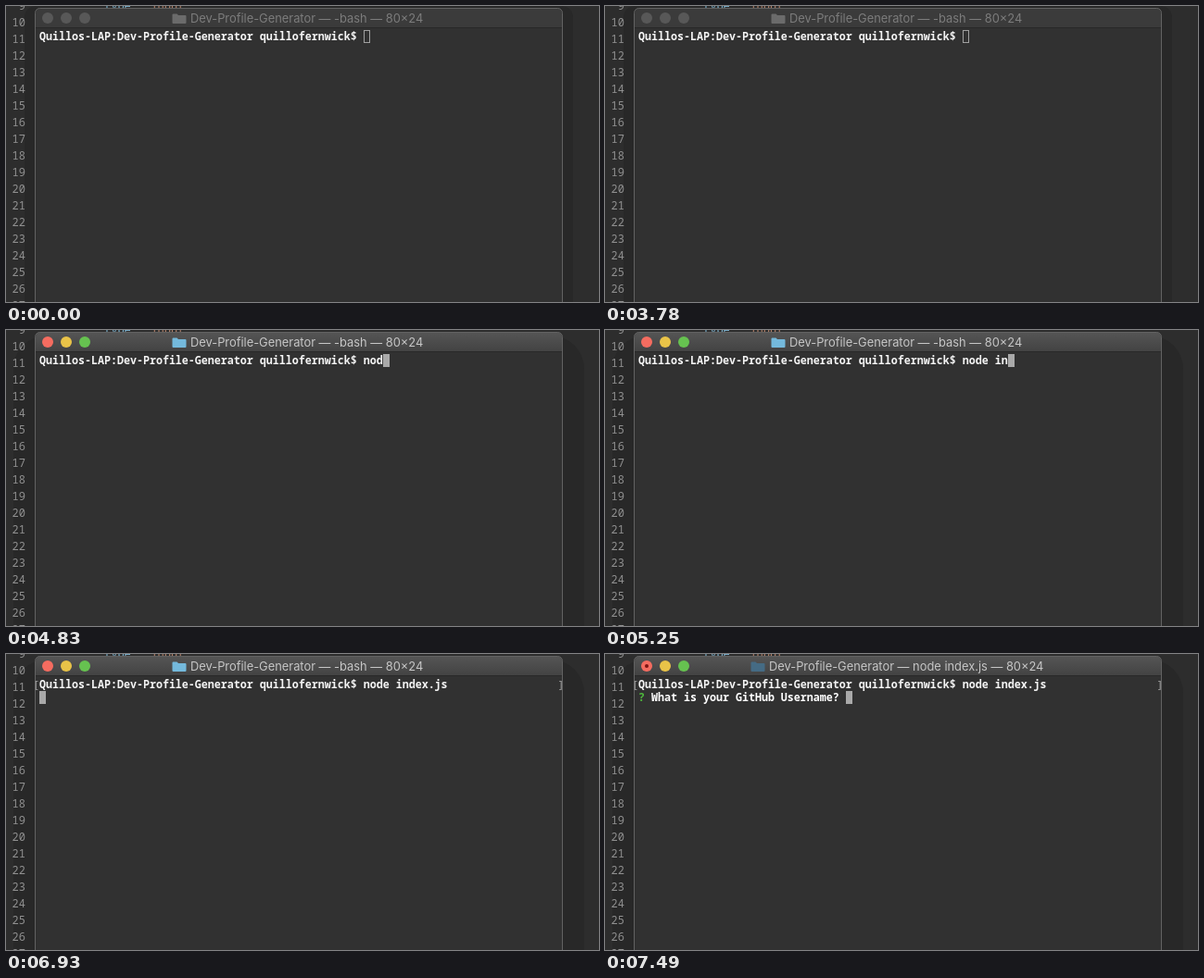
Write an HTML page that moves like this. It is 640x320 px and loops after 8000 ms.

```html
<!DOCTYPE html>
<html lang="en">
<head>
<meta charset="utf-8">
<title>Terminal session</title>
<style>
  html, body { margin: 0; width: 100%; height: 100%; overflow: hidden; background: #2d2d2d; }
  svg { display: block; width: 100%; height: 100%; }
  text { white-space: pre; }
  .editor { font: 12px "Noto Sans Mono", monospace; fill: #909090; }
  .title { font: 12.87px Inter, sans-serif; }
  .term { font: 600 11.667px "Noto Sans Mono", monospace; fill: #f4f4f4; }
  .term .bold { font-weight: 800; fill: #fff; }
  .term .mark { font-weight: 400; fill: #a2a2a2; }
</style>
</head>
<body>
<svg viewBox="0 0 640 320">
  <defs>
    <linearGradient id="activeBar" x2="0" y2="1">
      <stop stop-color="#555"/>
      <stop offset="1" stop-color="#434343"/>
    </linearGradient>
  </defs>
  <rect width="640" height="320" fill="#2d2d2d"/>
  <rect id="shadow" height="400" fill="#282828"/>
  <g id="gutter" class="editor" text-anchor="end"></g>
  <text class="editor" x="106" y="3.5"><tspan fill="#7fb4d0">type</tspan><tspan fill="#b0b0b0">: </tspan><tspan fill="#b5836b">"input"</tspan><tspan fill="#b0b0b0">,</tspan></text>

  <path d="M31.500 330V7.500a5 5 0 0 1 5-5H595.500a5 5 0 0 1 5 5V330Z" fill="#313131"/>
  <path id="bar" d="M32 23V7.500a5 5 0 0 1 5-5H595a5 5 0 0 1 5 5V23Z"/>
  <path d="M32 23.500H600" stroke="#282828"/>
  <path d="M31.500 330V7.500a5 5 0 0 1 5-5H595.500a5 5 0 0 1 5 5V330Z" fill="none" stroke="#626262"/>

  <g id="lights">
    <circle cx="45" cy="13" r="6"/>
    <circle cx="65" cy="13" r="6"/>
    <circle cx="85" cy="13" r="6"/>
  </g>
  <circle id="busyDot" cx="45" cy="13" r="2" fill="#7d1512"/>
  <path id="folder" d="M0 9.500a1 1 0 0 1 1-1H5l1.500 1.500H14a1 1 0 0 1 1 1V18a1 1 0 0 1-1 1H1a1 1 0 0 1-1-1Z"/>
  <text id="title" class="title" y="18"></text>

  <g class="term">
    <g id="brackets">
      <text class="mark" x="29" y="37">[</text>
      <text class="mark" x="595.500" y="37">]</text>
    </g>
    <text id="command" x="36" y="37"></text>
    <text id="question" class="bold" x="36" y="51"><tspan fill="#4fb83d">?</tspan> What is your GitHub Username?</text>
  </g>
  <rect id="cursor"/>
</svg>
<script>
const LOOP = 8000;
const FOCUS = 3850, ENTER = 6790, BUSY = 7000, ASK = 7350;
const COMMAND = "node index.js";
const KEY_TIMES = [4550, 4690, 4830, 4900, 5040, 5110, 5250, 5390, 5460, 5600, 5810, 5950, 6090];
const PROMPT = "Quillos-LAP:Dev-Profile-Generator quillofernwick$ ";
const QUESTION_COLS = 32;
const CELL = 7, LEFT = 36, TOP = 26, LINE = 14;
const LIGHTS = ["#f56c60", "#e9c348", "#66c250"];

const $ = id => document.getElementById(id);
const set = (el, attrs) => {
  for (const [name, value] of Object.entries(attrs)) el.setAttribute(name, value);
};

for (let n = 9; n <= 27; n++) {
  const label = document.createElementNS("http://www.w3.org/2000/svg", "text");
  set(label, { x: 21, y: 21.5 + (n - 10) * 18 });
  label.textContent = n;
  $("gutter").append(label);
}

function drawWindow(active, busy) {
  set($("shadow"), active
    ? { x: 8, y: 6, width: 616, rx: 36 }
    : { x: 20, y: 0, width: 592, rx: 12 });
  set($("bar"), { fill: active ? "url(#activeBar)" : "#3b3b3b" });
  [...$("lights").children].forEach((light, i) =>
    set(light, { fill: active ? LIGHTS[i] : "#585858" }));
  set($("busyDot"), { visibility: busy ? "visible" : "hidden" });
  set($("folder"), {
    transform: `translate(${busy ? 157.5 : 179.5} 0)`,
    fill: busy ? "#456b84" : active ? "#74b9dc" : "#6b6b6b"
  });
  set($("title"), { x: busy ? 177 : 199, fill: active ? "#c6c6c6" : "#7c7c7c" });
  $("title").textContent = `Dev-Profile-Generator — ${busy ? "node index.js" : "-bash"} — 80×24`;
}

function drawCursor(col, row, active) {
  const inset = active ? 0 : 0.5;
  set($("cursor"), {
    x: LEFT + col * CELL + inset,
    y: TOP + row * LINE + inset,
    width: CELL - 2 * inset,
    height: LINE - 2 * inset,
    fill: active ? "#a9a9a9" : "none",
    stroke: active ? "none" : "#a0a0a0"
  });
}

function draw(t) {
  const active = t >= FOCUS, entered = t >= ENTER, asked = t >= ASK;
  const typed = KEY_TIMES.filter(time => time <= t).length;
  drawWindow(active, t >= BUSY);
  $("command").textContent = PROMPT + COMMAND.slice(0, typed);
  set($("brackets"), { visibility: entered ? "visible" : "hidden" });
  set($("question"), { visibility: asked ? "visible" : "hidden" });
  const col = asked ? QUESTION_COLS : entered ? 0 : PROMPT.length + typed;
  drawCursor(col, entered ? 1 : 0, active);
}

const start = performance.now();
function tick() {
  draw((performance.now() - start) % LOOP);
  requestAnimationFrame(tick);
}
tick();
</script>
</body>
</html>
```
